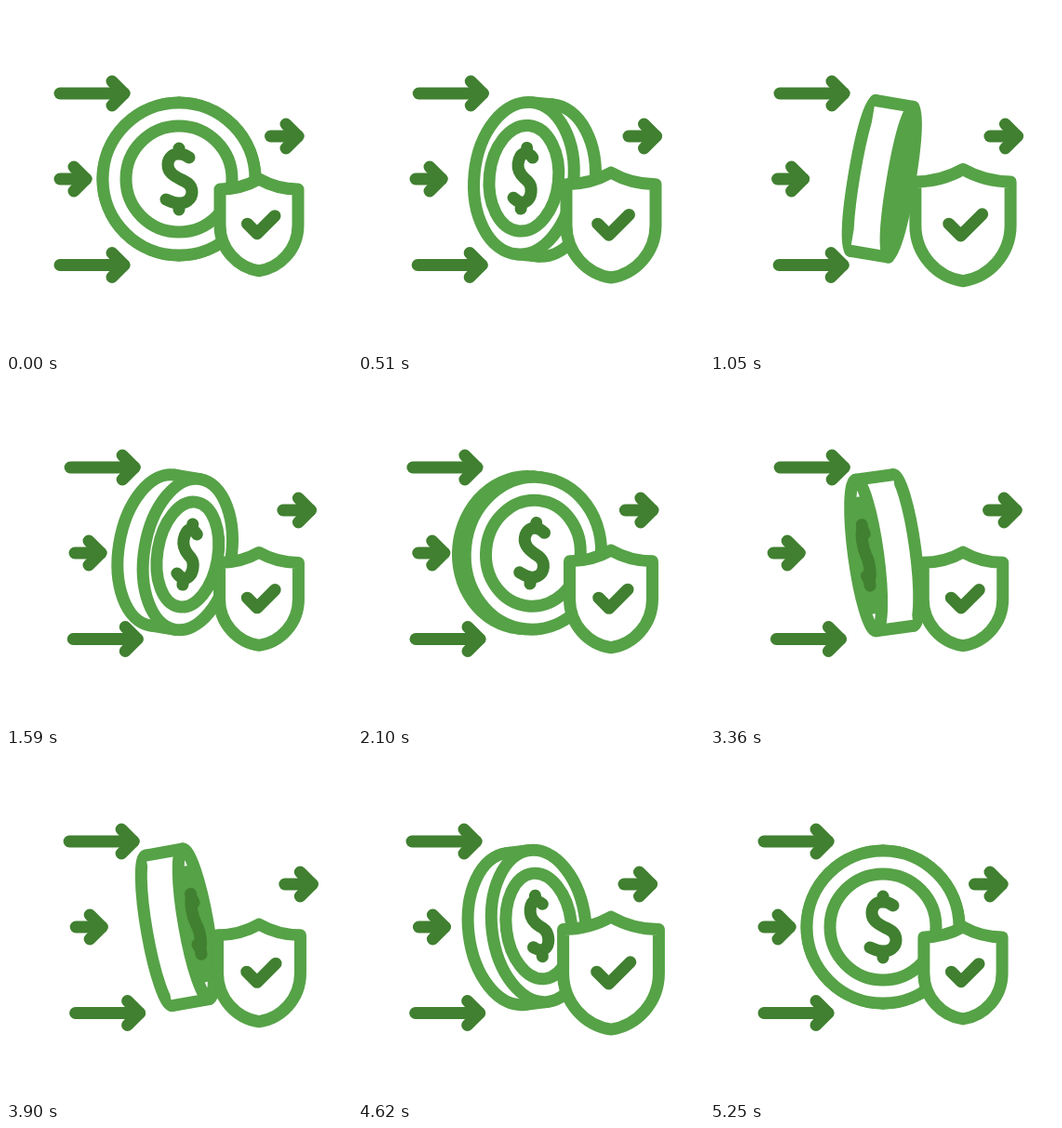
These frames come from a looping animation (372 by 372 pixels, 5.4 s). An HTML page with a canvas:

```html
<!DOCTYPE html>
<html lang="en">
<head>
<meta charset="utf-8">
<title>Secure payment</title>
<style>
html, body { margin: 0; width: 100%; height: 100%; overflow: hidden; background: #fff; }
canvas { display: block; width: 372px; height: 372px; }
</style>
</head>
<body>
<canvas id="stage" width="372" height="372"></canvas>
<script>
const ctx = document.getElementById('stage').getContext('2d');
const LOOP = 5400, END = 5250, STEP = 30;
const LIGHT = '#56a247', DARK = '#408030';
const TAU = Math.PI * 2;

// Coin spin: [time, degrees]
const SPIN = [[0, 0], [1050, -96.5], [2100, -153], [2850, -236], [3900, -279], [4620, -308], [END, -360]];

const ARROWS = [
  { tail: 58, tip: 127, y: 94, from: 0, period: 2265 },
  { tail: 58, tip: 86, y: 186, from: 100, period: 2550 },
  { tail: 58, tip: 127, y: 278.5, from: 0, period: 2500 },
  { tail: 284.5, tip: 314, y: 140, from: 0, period: 2425 }
];

const DOLLAR = [
  [11, -23], [5, -27, 3, -27, -1, -27], [-9, -27, -12, -20, -12, -15],
  [-12, -7, -5, -3, 1, 0], [8, 3, 14, 6, 14, 14],
  [14, 22, 7, 26, 0, 26], [-6, 26, -9, 24, -14, 22]
];

const wave = x => (1 - Math.cos(TAU * x)) / 2;

function slope(i) {
  const a = SPIN[Math.max(0, i - 1)], b = SPIN[Math.min(SPIN.length - 1, i + 1)];
  return (b[1] - a[1]) / (b[0] - a[0]);
}

function spinAt(t) {
  let i = 0;
  while (i < SPIN.length - 2 && t > SPIN[i + 1][0]) i++;
  const [t0, a] = SPIN[i], [t1, b] = SPIN[i + 1];
  const w = t1 - t0, u = (t - t0) / w, v = 1 - u;
  return a * v * v * (1 + 2 * u) + b * u * u * (3 - 2 * u)
    + w * u * v * (slope(i) * v - slope(i + 1) * u);
}

function line(...pts) {
  ctx.beginPath();
  for (let i = 0; i < pts.length; i += 2) ctx.lineTo(pts[i], pts[i + 1]);
  ctx.stroke();
}

function oval(x, rx, ry) {
  ctx.beginPath();
  ctx.ellipse(x, 0, rx, ry, 0, 0, TAU);
  ctx.fill();
  ctx.stroke();
}

function drawArrow({ tail, tip, y, from, period }, t) {
  const turns = (t - from) / period;
  const dx = turns > 0 && turns < 2 ? 17.2 * wave(turns) : 0;
  ctx.save();
  ctx.translate(dx, y);
  ctx.strokeStyle = DARK;
  line(tail, 0, tip, 0);
  line(tip - 13, -13, tip, 0, tip - 13, 13);
  ctx.restore();
}

function drawDollar(x, sx) {
  ctx.strokeStyle = DARK;
  ctx.beginPath();
  for (const p of DOLLAR) {
    const q = p.map((v, i) => i % 2 ? v : x + v * sx);
    if (q.length === 2) ctx.moveTo(...q);
    else ctx.bezierCurveTo(...q);
  }
  ctx.moveTo(x, -33);
  ctx.lineTo(x, -27);
  ctx.moveTo(x, 26);
  ctx.lineTo(x, 33);
  ctx.stroke();
}

function drawCoin(t) {
  const a = spinAt(t) * Math.PI / 180;
  const c = Math.abs(Math.cos(a)), flat = 1 - c;
  const side = Math.sign(Math.sin(a) * Math.cos(a));
  const front = side * 22 * flat;
  const back = -side * 22 * Math.sin(Math.PI / 2 * Math.min(1, 1.45 * flat));
  ctx.save();
  ctx.translate(186, 186);
  ctx.rotate(10 * Math.sin(TAU * t / END) * Math.PI / 180);
  ctx.strokeStyle = LIGHT;
  ctx.fillStyle = '#fff';
  oval(back, 82 * c, 82);
  ctx.fillRect(Math.min(back, front), -82, Math.abs(back - front), 164);
  line(back, -82, front, -82);
  line(back, 82, front, 82);
  oval(front, 82 * c, 82);
  oval(front, 57 * c, 57);
  if (c > 0.13) drawDollar(front, c);
  ctx.restore();
}

function drawShield(t) {
  const p = t % 1800;
  const k = p < 900 ? p / 900 : Math.max(0, 1 - (p - 900) / 800);
  const s = 1 + 0.237 * wave(k / 2);
  const X = v => 272 + v * s, Y = v => 234.4 + v * s;
  const curve = (...v) => ctx.bezierCurveTo(...v.map((n, i) => i % 2 ? Y(n) : X(n)));
  ctx.strokeStyle = LIGHT;
  ctx.fillStyle = '#fff';
  ctx.beginPath();
  ctx.moveTo(X(0), Y(-48.4));
  curve(13, -41, 25, -37.4, 42, -37.4);
  ctx.lineTo(X(42), Y(1));
  curve(42, 27, 23, 47, 0, 50.4);
  curve(-23, 47, -42, 27, -42, 1);
  ctx.lineTo(X(-42), Y(-37.4));
  curve(-25, -37.4, -13, -41, 0, -48.4);
  ctx.closePath();
  ctx.fill();
  ctx.stroke();
  ctx.strokeStyle = DARK;
  line(X(-12.5), Y(-0.2), X(-2), Y(10.3), X(17), Y(-8.7));
}

function draw(t) {
  ctx.fillStyle = '#fff';
  ctx.fillRect(0, 0, 372, 372);
  ctx.lineWidth = 13;
  ctx.lineCap = ctx.lineJoin = 'round';
  drawCoin(t);
  drawShield(t);
  for (const arrow of ARROWS) drawArrow(arrow, t);
}

const start = performance.now();

function tick() {
  const t = (performance.now() - start) % LOOP;
  // The last pose rests until the loop restarts
  draw(t < END ? Math.floor(t / STEP) * STEP : END);
  requestAnimationFrame(tick);
}
tick();
</script>
</body>
</html>
```
